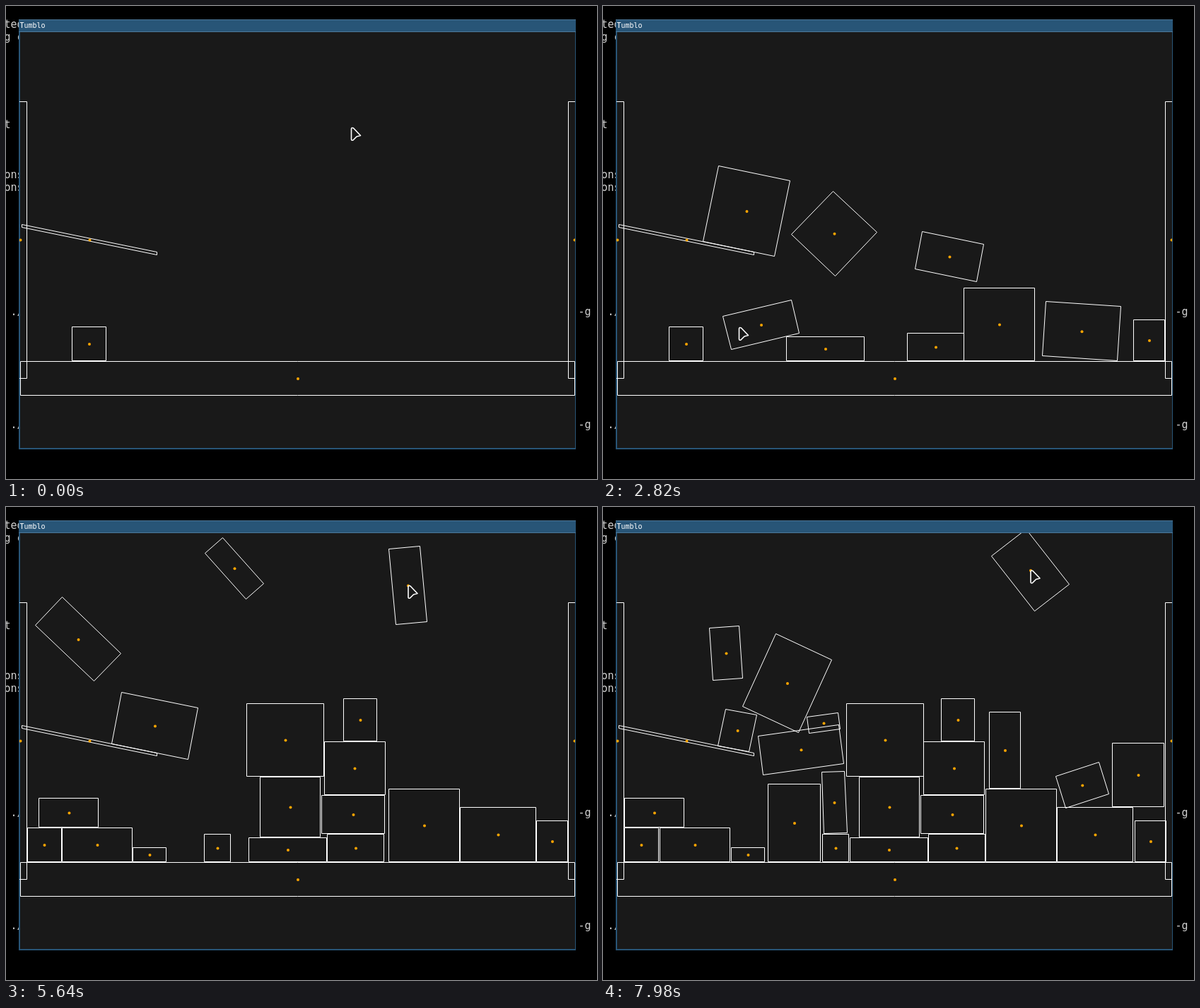
An HTML page with a canvas for the animation above (8 s loop, 836 by 670 pixels).

```html
<!DOCTYPE html>
<html>
<head>
<meta charset="utf-8">
<style>
html, body { margin: 0; height: 100%; overflow: hidden; background: #000; }
canvas { display: block; }
</style>
</head>
<body>
<canvas id="stage" width="836" height="670"></canvas>
<script>
const c = document.getElementById('stage').getContext('2d');
const LOOP = 8000, GRAVITY = 981, SLIDE = 105, TILT = 11.4;
const rad = deg => deg * Math.PI / 180;
const mix = (a, b, u) => a + (b - a) * u;
const rampTop = x => 329 + (x - 118) * Math.tan(rad(TILT));
const boxes = [], path = [];

// A box passes through phases: it falls, may slide down the ramp, then rests on a support.
class Box {
  constructor(w, h, from, pose) {
    Object.assign(this, { w, h, from, phases: [{ from, pose }] });
    boxes.push(this);
  }
  at(t) {
    return this.phases.findLast(p => p.from <= t)?.pose(t);
  }
  reach(a) {
    return (this.w * Math.abs(Math.sin(rad(a))) + this.h * Math.abs(Math.cos(rad(a)))) / 2;
  }
  top(t) {
    const { y, a } = this.at(t);
    return y - this.reach(a);
  }
  // The support is another box or a fixed height
  restY(t, on, a) {
    return (on.top ? on.top(t) : on) - 1 - this.reach(a);
  }
  hitTime(surface) {
    let t = this.from;
    while (this.at(t).y < surface(t, this.at(t))) t += 4;
    return t;
  }
  ramp() {
    const fall = this.phases[0].pose;
    const surface = x => rampTop(x) - this.h / 2 / Math.cos(rad(TILT));
    const hit = this.hitTime((t, p) => surface(p.x));
    this.phases.push({ from: hit, pose: t => {
      const s = (t - hit) / 1000, x = fall(t).x + SLIDE * s * s / 2;
      return { x, y: surface(x), a: mix(fall(hit).a, TILT, Math.min(s * 10, 1)) };
    } });
    return this;
  }
  to(from, until, x, on, angle) {
    const p = this.at(from), gap = p.y - this.restY(from, on, p.a);
    Object.assign(this, { on, angle });
    this.phases.push({ from, pose: t => {
      const u = Math.min((t - from) / (until - from), 1), a = mix(p.a, angle, u);
      return { x: mix(p.x, x, u), y: this.restY(t, on, a) + gap * (1 - u * u), a };
    } });
    return this;
  }
  land(on, angle = 0, x, span = 150) {
    const hit = this.hitTime((t, p) => this.restY(t, on, p.a));
    return this.to(hit, hit + span, x ?? this.at(hit).x, on, angle);
  }
  shift(from, until, x, angle = this.angle) {
    return this.to(from, until, x, this.on, angle);
  }
}

const solid = (w, h, x, y, a = 0) => new Box(w, h, 0, () => ({ x, y, a }));

function drop(t0, w, h, x, y, a = 0, spin = 0, vx = 0) {
  if (t0) path.push([t0, x, y]);
  return new Box(w, h, t0, t => {
    const s = (t - t0) / 1000;
    return { x: x + vx * s, y: y + GRAVITY * s * s / 2, a: a + spin * s };
  });
}

const floor = solid(784, 48, 412.5, 527.5);
solid(18, 392, 20, 331);
solid(18, 392, 804, 331);
solid(195, 4, 118, 331, TILT);

const crate = drop(0, 48, 48, 117.5, 478.5).land(floor).shift(2950, 3200, 109.5).shift(4500, 5640, 54);
const plank = drop(440, 34, 110, 195, 168, 11, 0, 58).ramp().to(1110, 1600, 314.5, floor, 90)
  .shift(2900, 4400, 344.5).shift(4500, 5640, 398.5).shift(5640, 6500, 404.5);
const big = drop(571, 100, 103, 540, 165, 0, -6).land(floor, 0, 560.5).shift(2900, 3700, 591.5);
const giant = drop(865, 103, 109, 99.5, 121, 9, 2).ramp();
drop(1250, 44, 58, 734, 82, 8, -8).land(floor).shift(2580, 2760, 772.5).shift(7260, 7980, 774.5);
const low = drop(1550, 80, 39, 470.5, 130, 4, -4).land(floor)
  .shift(2900, 3700, 482.5).shift(4500, 5640, 494.5).shift(5640, 6500, 500);
const wide = drop(2006, 107, 77, 677, 135, 10, -7.8).land(floor).shift(2900, 3900, 696);
drop(2077, 99, 48, 231, 180, 4, -23.6, -10).land(floor).shift(2900, 3060, 184)
  .shift(4500, 5640, 129).shift(7260, 7980, 130);
const cube = drop(2220, 85, 85, 327, 145, 35, 14.3).land(plank, 90, 381, 400)
  .shift(4500, 5640, 402).shift(5640, 6500, 405);
giant.to(3000, 3800, 343.5, cube, 98).shift(4500, 5640, 395, 90).shift(5640, 6500, 399);
const slab = drop(2390, 89, 54, 490, 264, 8, 8).land(low, 0, 470)
  .shift(4500, 5640, 491).shift(5640, 6500, 494);
drop(2960, 84, 41, 165, 395).land(crate, 0, 124.5).shift(4500, 5640, 89).shift(5640, 6340, 72.5);
drop(3680, 20, 47, 275.5, 140.5, 50, -32).land(floor, -90, 203, 500).shift(7260, 7980, 205);
const block = drop(3800, 86, 75, 481, 98, -4, -6.5).land(slab, 0, 493, 400).shift(5640, 6500, 496.5);
drop(4020, 110, 74, 98.6, 43, -45, 40.6, 42.5).ramp().to(5680, 6350, 268.5, floor, 90)
  .shift(7260, 7980, 270.5);
drop(4260, 47, 60, 498.5, 94.5, 4, 10).land(block, 0, 501, 300)
  .shift(6300, 6600, 510.5).shift(7260, 7980, 502);
const stub = drop(4720, 37, 39, 299, 150, -6, 7).land(floor).shift(5800, 6600, 329);
drop(5200, 115, 55, 84.4, 92, 62, -42, 40).ramp().to(6400, 6950, 285, 380, -3.5)
  .shift(7260, 7980, 280, -8);
drop(5480, 87, 33, 323, 74, 40, 50).land(stub, 88, 325, 300).shift(7260, 7980, 327);
drop(5630, 44, 108, 568.5, 111, -5).land(big);
const chip = drop(6200, 44, 23, 312, 115, 20, -36).land(321, -3, 321).shift(7260, 7980, 312, -7);
drop(6350, 73, 90, 745, 105, -9, 9).land(wide, -1.4).shift(7260, 7980, 757, 0);
drop(6700, 113, 87, 287, 95, -5, -10).land(chip, -10.7, 287, 20).to(7270, 7980, 260.5, 320, -65);
drop(6830, 45, 53, 155.5, 150, 44, -24, 15).ramp();
drop(7245, 64, 47, 605, 134, 55, -100, 100).land(wide, -17.5);
drop(7550, 42, 74, 174, 116, -9, 13);
drop(7970, 99, 63, 604.5, 89.5, 52);

// The pointer lingers at each drop point, then hurries to the next
path.push([0, 488, 172], [2820, 192, 455]);
path.sort((a, b) => a[0] - b[0]);

function pointerAt(t) {
  const i = path.findLastIndex(p => p[0] <= t), p = path[i], q = path[i + 1] || p;
  const wait = .53, u = Math.max(0, ((t - p[0]) / (q[0] - p[0] || 1) - wait) / (1 - wait));
  const e = p === q ? 0 : u * u * (3 - 2 * u);
  return [mix(p[1], q[1], e), mix(p[2], q[2], e)];
}

const snap = v => Math.floor(v + .01) + .5;

function drawBox(box, t) {
  const p = box.at(t);
  if (!p) return;
  const cos = Math.cos(rad(p.a)), sin = Math.sin(rad(p.a));
  c.beginPath();
  for (const [i, j] of [[-1, -1], [1, -1], [1, 1], [-1, 1]]) {
    const dx = i * box.w / 2, dy = j * box.h / 2;
    c.lineTo(snap(p.x + dx * cos - dy * sin), snap(p.y + dx * sin + dy * cos));
  }
  c.closePath();
  c.stroke();
  c.beginPath();
  c.arc(p.x + .5, p.y + .5, 2, 0, 7);
  c.fill();
}

function drawPointer(t) {
  c.save();
  c.translate(...pointerAt(t));
  c.beginPath();
  c.moveTo(.5, 2);
  c.quadraticCurveTo(1, -.5, 3.5, 1);
  c.lineTo(13.5, 11.5);
  c.lineTo(8, 13);
  c.lineTo(3, 18);
  c.quadraticCurveTo(.5, 19, .5, 16.5);
  c.closePath();
  c.fillStyle = '#191919';
  c.fill();
  c.lineJoin = 'round';
  c.lineWidth = 1.6;
  c.stroke();
  c.restore();
}

function rect(color, x, y, w, h) {
  c.fillStyle = color;
  c.fillRect(x, y, w, h);
}

function drawDesktop() {
  rect('#000', 0, 0, 836, 670);
  c.font = '15px "DejaVu Sans Mono", monospace';
  c.fillStyle = '#d0d0d0';
  const rows = { 0: 'ted', 1: 'g c', 8: 't -', 12: 'ons', 13: 'ons', 23: ' ./', 32: ' ./' };
  for (const row in rows) {
    const y = Math.round(31.4 + 17.7 * row);
    c.fillText(rows[row], -2.5, y);
    if (row > 20) c.fillText('-g', 809.5, y);
  }
  rect('#285577', 18, 19, 788, 609);
  rect('#4c7899', 18, 19, 788, 1);
  rect('#4c7899', 18, 36, 788, 1);
  rect('#191919', 20, 37, 785, 589);
  c.font = '10px "DejaVu Sans Mono", monospace';
  c.fillStyle = '#fff';
  c.fillText('Tumblo', 19.5, 31);
}

function frame() {
  const t = performance.now() % LOOP;
  drawDesktop();
  c.save();
  c.beginPath();
  c.rect(19, 37, 786, 589);
  c.clip();
  c.strokeStyle = '#fff';
  c.fillStyle = '#ffa500';
  c.lineWidth = 1;
  for (const box of boxes) drawBox(box, t);
  drawPointer(t);
  c.restore();
  requestAnimationFrame(frame);
}
frame();
</script>
</body>
</html>
```
